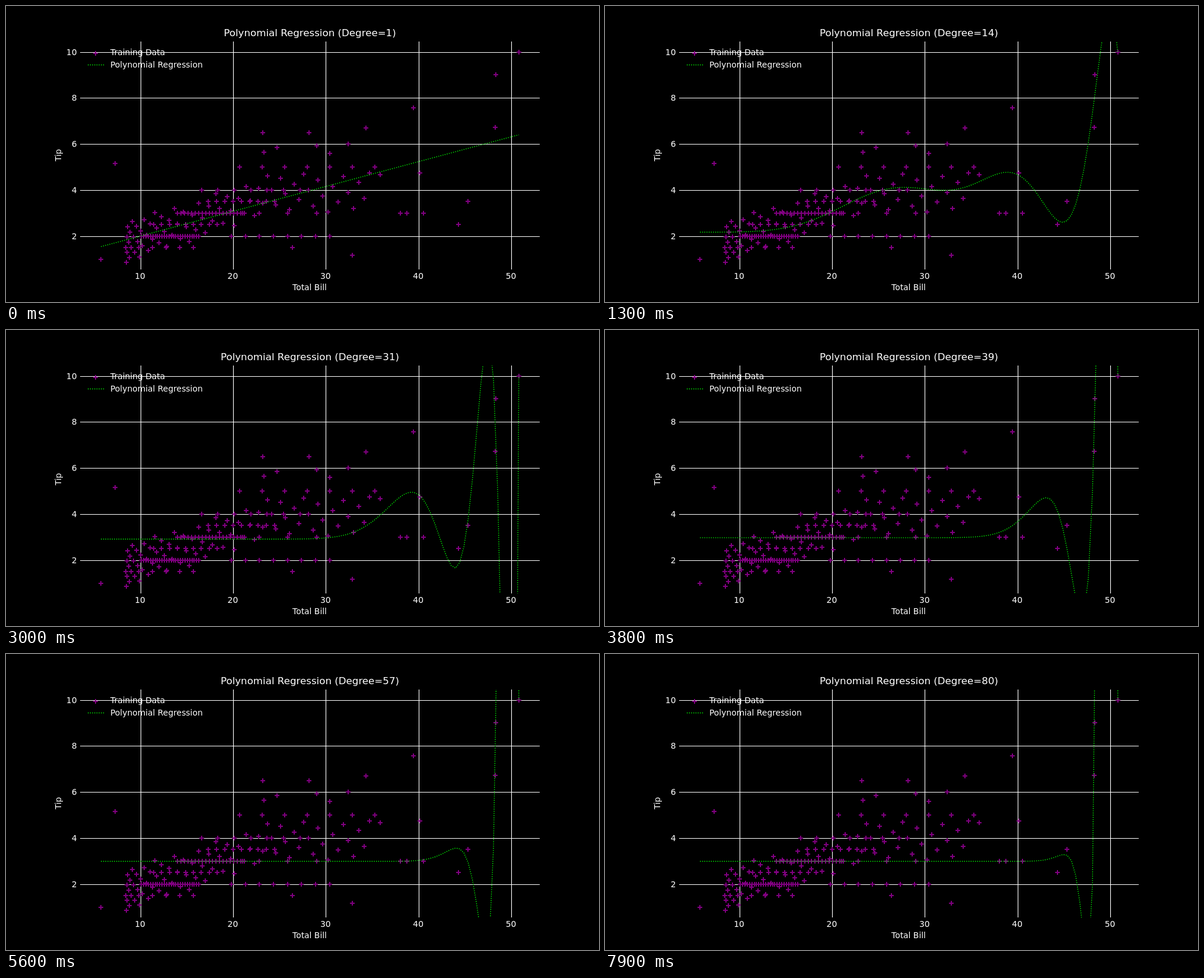
These frames come from a looping animation (1000x500 px, 8 s). An HTML page:

```html
<!DOCTYPE html>
<html lang="en">
<head>
<meta charset="utf-8">
<title>Polynomial Regression</title>
<style>
  html, body { margin: 0; width: 100%; height: 100%; overflow: hidden; background: #000; }
  svg { display: block; width: 100%; height: 100%; }
  text { font: 13.889px "DejaVu Sans", sans-serif; fill: #fff; }
  .title { font-size: 16.667px; }
  .middle { text-anchor: middle; }
  .end { text-anchor: end; }
  .marks { stroke: #800080; stroke-width: 2; fill: none; }
  .grid { stroke: #fff; stroke-width: 1.11; }
  .dots { stroke: #0f0; stroke-width: 1.389; stroke-dasharray: 1.389 2.292; stroke-linejoin: round; fill: none; }
</style>
</head>
<body>
<svg viewBox="0 0 1000 500">
  <clipPath id="axes"><rect x="125" y="60" width="775" height="385"/></clipPath>
  <path class="grid" id="grid"/>
  <path class="marks" id="scatter" clip-path="url(#axes)"/>
  <path class="dots" id="curve" clip-path="url(#axes)"/>
  <g id="ticks"></g>
  <text class="title middle" id="title" x="512.5" y="51"></text>
  <text class="middle" x="512" y="480">Total Bill</text>
  <text class="middle" transform="translate(93 252) rotate(-90)">Tip</text>
  <path class="marks" id="legendMark"/>
  <text x="176" y="83">Training Data</text>
  <path class="dots" d="M138 99.5H166"/>
  <text x="176" y="104">Polynomial Regression</text>
</svg>
<script>
const LOW = 5.75, HIGH = 50.81, SAMPLES = 100, DEGREES = 80, STEP_MS = 100;
const CLOUD = 77, GOLDEN = (Math.sqrt(5) - 1) / 2;
const range = n => Array.from({ length: n }, (_, i) => i);
const dot = (a, b) => a.reduce((sum, v, i) => sum + v * b[i], 0);
const mean = a => a.reduce((sum, v) => sum + v, 0) / a.length;
const byId = id => document.getElementById(id);
const px = bill => 125 + (bill - 3.497) * 775 / 49.566;
const py = tip => 445 - (tip - 0.55) * 385 / 9.9;

// Isolated points, which steer the curve.
const keyPoints = [
  [LOW, 1], [7.25, 5.15], [23.17, 6.5], [23.33, 5.65], [24.71, 5.85], [26.41, 1.5],
  [28.17, 6.5], [29.03, 5.92], [30.4, 5.6], [32.4, 6], [32.83, 1.17], [34.3, 6.7],
  [35.83, 4.67], [38.01, 3], [38.73, 3], [39.42, 7.58], [40.17, 4.73], [40.55, 3],
  [44.3, 2.5], [45.35, 3.5], [48.27, 6.73], [48.33, 9], [HIGH, 10]
];

// People like round tips: an even run of bills at one tip.
const run = (tip, from, to, count) =>
  range(count).map(i => [from + (to - from) * i / (count - 1), tip]);

// The rest spread evenly around a trend that levels off.
const cloud = range(CLOUD).map(i => {
  const bill = 8.5 + 26.5 * ((i + 0.5) / CLOUD) ** 1.7;
  const trend = 3.9 - 0.13 * Math.max(0, 25 - bill);
  return [bill, trend + 0.9 * (2 * (i * GOLDEN % 1) - 1)];
});

const points = [
  ...keyPoints, ...cloud,
  ...run(1.5, 8.4, 15.7, 6), ...run(2, 10.1, 16.3, 26), ...run(2, 19.8, 30.4, 8),
  ...run(2.5, 11.4, 18.3, 9), ...run(3, 14, 21.2, 20), ...run(3, 22.8, 29, 3),
  ...run(3.5, 17.3, 24.5, 9), ...run(4, 16.6, 27.2, 7), ...run(5, 20.7, 35.3, 7)
];
const bills = points.map(p => p[0]), tips = points.map(p => p[1]);
const meanTip = mean(tips);

function rotate(a, b, c, s) {
  for (let i = 0; i < a.length; i++) {
    const p = a[i], q = b[i];
    a[i] = c * p - s * q;
    b[i] = s * p + c * q;
  }
}

// One-sided Jacobi: makes the columns orthogonal in place, returns the right vectors.
function orthogonalise(cols) {
  const right = cols.map((_, i) => cols.map((_, j) => +(i === j)));
  for (let sweep = 0, moved = true; moved && sweep < 20; sweep++) {
    moved = false;
    for (let i = 0; i < cols.length; i++) for (let j = i + 1; j < cols.length; j++) {
      const a = dot(cols[i], cols[i]), b = dot(cols[j], cols[j]), ab = dot(cols[i], cols[j]);
      if (Math.abs(ab) <= 1e-14 * Math.sqrt(a) * Math.sqrt(b)) continue;
      const z = (b - a) / (2 * ab);
      const t = (z < 0 ? -1 : 1) / (Math.abs(z) + Math.sqrt(1 + z * z));
      const c = 1 / Math.sqrt(1 + t * t);
      rotate(cols[i], cols[j], c, c * t);
      rotate(right[i], right[j], c, c * t);
      moved = true;
    }
  }
  return right;
}

// Minimum-norm least squares on raw powers; tiny singular values are dropped.
// Powers far below the degree are too small to matter.
function fit(degree) {
  const powers = range(Math.min(degree, 12)).map(j => degree - j);
  const feature = (x, p) => (x / HIGH) ** p * HIGH ** (p - degree);
  const raw = powers.map(p => bills.map(x => feature(x, p)));
  const means = raw.map(mean);
  const cols = raw.map((col, j) => col.map(v => v - means[j]));
  const right = orthogonalise(cols);
  const sizes = cols.map(col => Math.sqrt(dot(col, col)));
  const cutoff = Math.max(...sizes) * bills.length * Number.EPSILON;
  const weights = powers.map(() => 0);
  cols.forEach((col, k) => {
    if (sizes[k] <= cutoff) return;
    const gain = dot(col, tips) / sizes[k] ** 2;
    right[k].forEach((v, j) => weights[j] += gain * v);
  });
  return x => powers.reduce((sum, p, j) => sum + weights[j] * (feature(x, p) - means[j]), meanTip);
}

// Polyline cut at the stage edges, so that the dots restart on re-entry.
function curvePath(predict) {
  const line = range(SAMPLES).map(i => {
    const x = LOW + (HIGH - LOW) * i / (SAMPLES - 1);
    return [px(x), py(predict(x))];
  });
  const top = -1, bottom = 501;
  let path = '', open = false;
  for (let i = 1; i < line.length; i++) {
    const [x0, y0] = line[i - 1], [x1, y1] = line[i];
    const at = y => {
      const edge = Math.min(bottom, Math.max(top, y));
      const x = edge === y0 ? x0 : edge === y1 ? x1 : x0 + (x1 - x0) * (edge - y0) / (y1 - y0);
      return x.toFixed(2) + ' ' + edge.toFixed(2);
    };
    if (Math.max(y0, y1) < top || Math.min(y0, y1) > bottom) { open = false; continue; }
    if (!open) path += 'M' + at(y0);
    path += 'L' + at(y1);
    open = y1 >= top && y1 <= bottom;
  }
  return path;
}

const cross = (x, y) => `M${x - 4} ${y}h8M${x} ${y - 4}v8`;
const snap = v => Math.floor(v + 0.5 + 1e-6);

byId('scatter').setAttribute('d', points.map(([x, y]) => cross(snap(px(x)), snap(py(y)))).join(''));
byId('legendMark').setAttribute('d', cross(151, 80));

let grid = '', labels = '';
for (let x = 10; x <= 50; x += 10) {
  grid += `M${snap(px(x)) + 0.5} 60V445`;
  labels += `<text class="middle" x="${px(x) - 0.6}" y="461">${x}</text>`;
}
for (let y = 2; y <= 10; y += 2) {
  grid += `M125 ${snap(py(y)) + 0.5}H900`;
  labels += `<text class="end" x="119.5" y="${snap(py(y)) + 5}">${y}</text>`;
}
byId('grid').setAttribute('d', grid);
byId('ticks').innerHTML = labels;

const curves = range(DEGREES).map(i => curvePath(fit(i + 1)));
let shown = -1;

function draw() {
  const step = Math.floor(performance.now() / STEP_MS) % DEGREES;
  if (step !== shown) {
    shown = step;
    byId('curve').setAttribute('d', curves[step]);
    byId('title').textContent = `Polynomial Regression (Degree=${step + 1})`;
  }
  requestAnimationFrame(draw);
}
draw();
</script>
</body>
</html>
```
